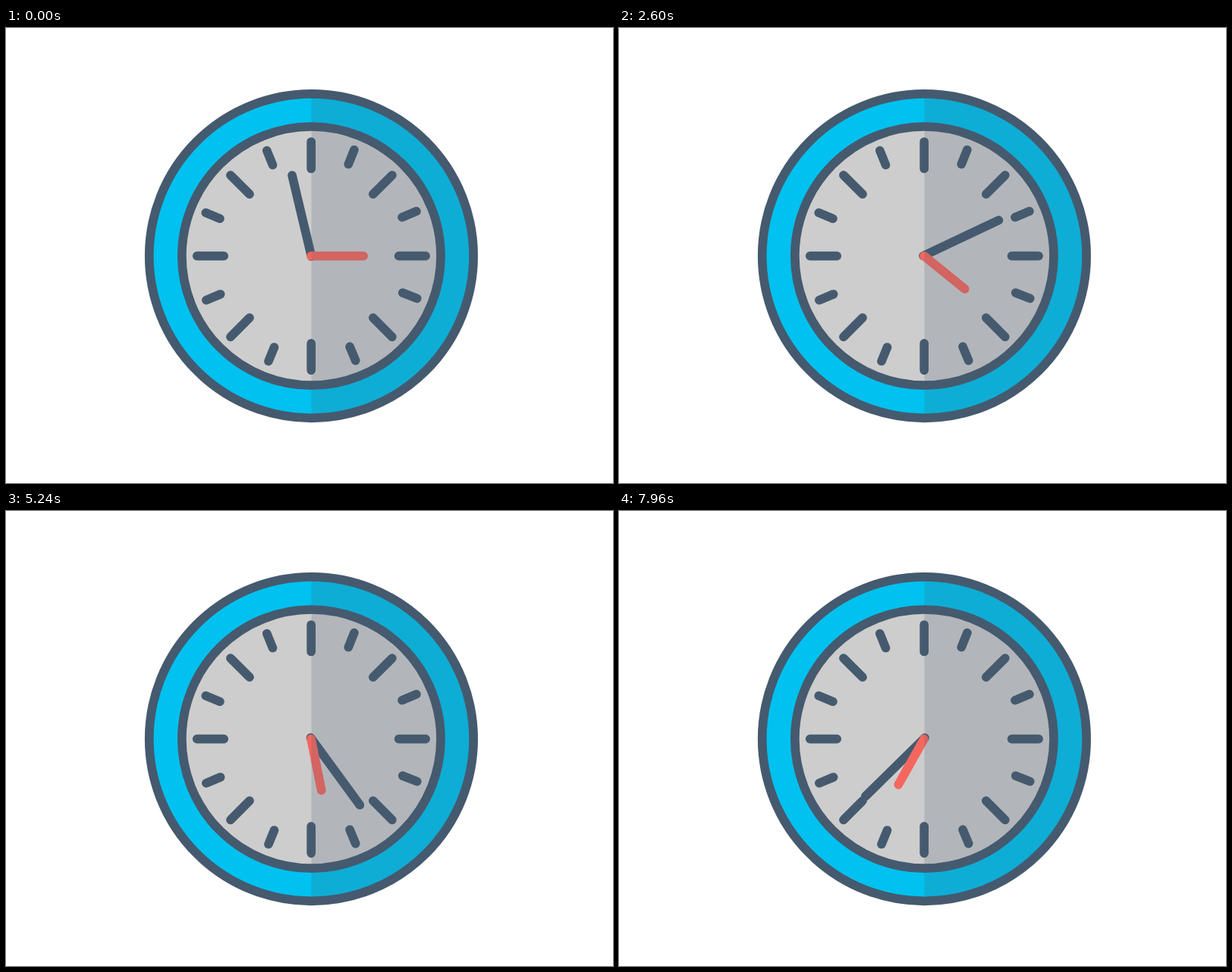
These frames come from a looping animation (800x600 px, 8000 ms). An HTML page:

```html
<!DOCTYPE html>
<html lang="en">
<head>
<meta charset="utf-8">
<title>Clock</title>
<style>
  html, body { margin: 0; width: 100%; height: 100%; overflow: hidden; background: #fff; }
  svg { display: block; width: 100%; height: 100%; }
  .ink { stroke: #455a6e; stroke-width: 11.7; stroke-linecap: round; }
  .red { stroke: #f5675e; stroke-width: 11.7; stroke-linecap: round; }
</style>
</head>
<body>
<svg viewBox="0 0 800 600">
  <circle class="ink" cx="402.4" cy="300.6" r="213.7" fill="#00c1ef"/>
  <circle class="ink" cx="402.4" cy="300.6" r="170.6" fill="#cdcdcd"/>
  <path class="ink" fill="none" d="
    M402.2 150V185.5M402.2 415.8V451.3M251.7 300.6H287.2M517.6 300.6H553.1
    M295.9 194.2L321 219.2M508.9 194.2L483.8 219.2M295.9 407.3L321 382.2M483.8 382.2L508.9 407.3
    M343.8 161.6L351.5 180.6M458.9 160.6L451.3 179.6M263.3 243.7L281.9 251.3M540.9 241.7L522 249.6
    M263.9 358.8L282.6 351M522.8 349.2L541.7 356.6M353.5 421L346 439.4M453.1 420.2L460.7 438.6"/>
  <line id="minute" class="ink" y1="1.2" y2="-108.7"/>
  <line id="hour" class="red" x2="69.1"/>
  <path d="M402.5 81A219.6 219.6 0 0 1 402.5 520.2Z" fill="#455a6e" fill-opacity=".2"/>
</svg>
<script>
  const LOOP = 8000;
  const minute = document.getElementById('minute');
  const hour = document.getElementById('hour');

  function turn(hand, x, y, deg) {
    hand.setAttribute('transform', `translate(${x} ${y}) rotate(${deg})`);
  }

  function draw(ms) {
    const s = (ms % LOOP) / 1000;
    turn(minute, 402.2, 300, 30 * s - 13.4);
    turn(hour, 402.1, 300.6, 15 * s);
  }

  const start = performance.now();
  function tick() {
    draw(performance.now() - start);
    requestAnimationFrame(tick);
  }
  tick();
</script>
</body>
</html>
```
